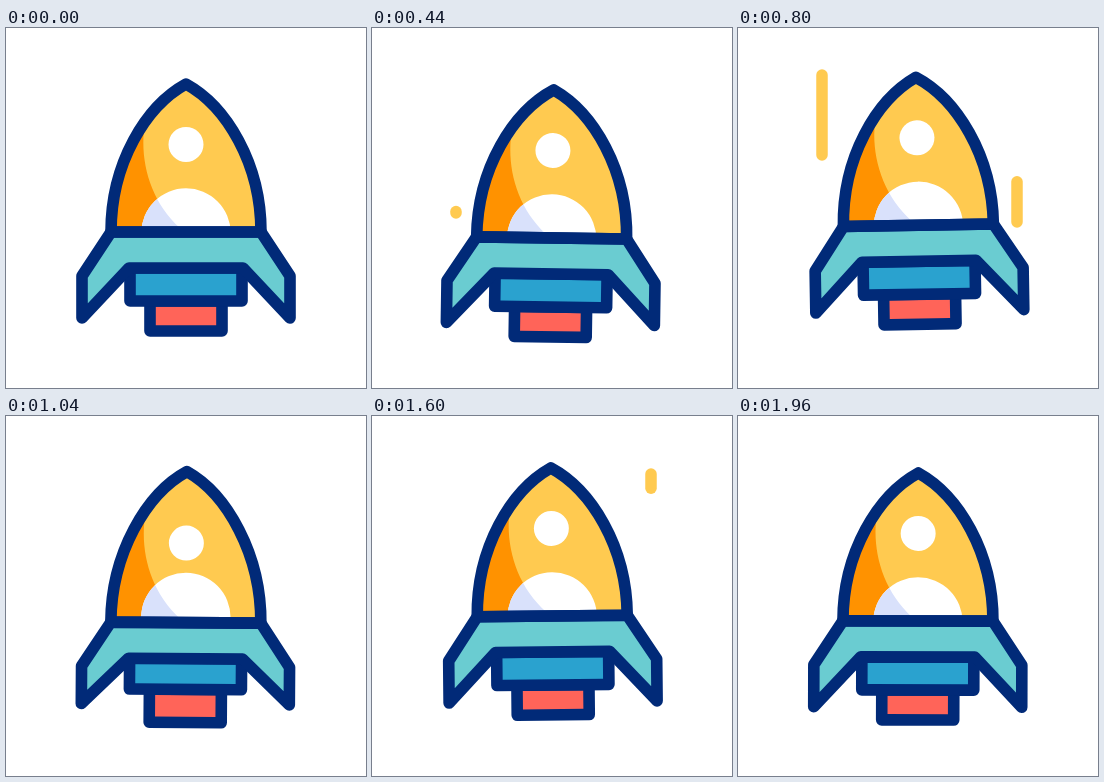
Recreate the animation shown at these times as an HTML page. Size 360 by 360 pixels, loop 2000 ms.

```html
<!DOCTYPE html>
<html lang="en">
<head>
<meta charset="utf-8">
<title>Rocket</title>
<style>
html, body { margin: 0; width: 100%; height: 100%; overflow: hidden; background: #fff; }
svg { display: block; width: 100vw; height: 100vh; }
</style>
</head>
<body>
<svg viewBox="0 0 360 360">
  <defs>
    <path id="hull"/>
    <path id="shade" d="M139 95C133 130 143 172 174 200V210H90V40H139Z"/>
    <circle id="torso" cx="180" cy="205" r="44.7"/>
    <clipPath id="inHull"><use href="#hull"/></clipPath>
    <clipPath id="inShade"><use href="#shade"/></clipPath>
  </defs>
  <g stroke="#ffca50" stroke-width="11.5" stroke-linecap="round">
    <line id="left" x1="84" x2="84"/>
    <line id="right" x1="279" x2="279"/>
  </g>
  <g id="rocket">
    <g clip-path="url(#inHull)">
      <use href="#hull" fill="#ffca50"/>
      <use href="#shade" fill="#ff9200"/>
      <use href="#torso" fill="#fff"/>
      <g clip-path="url(#inShade)"><use href="#torso" fill="#d9e1fb"/></g>
      <circle id="head" cx="180" r="17.5" fill="#fff"/>
    </g>
    <g stroke="#012a78" stroke-width="11.6" stroke-linejoin="round">
      <path id="nozzle" fill="#ff6459"/>
      <path id="engine" fill="#2aa2cf"/>
      <path id="wings" fill="#6accd1"/>
      <use href="#hull" fill="none"/>
    </g>
  </g>
</svg>
<script>
const LOOP = 2000, BOB = LOOP / 3, STREAK = 480, FIRST_STREAK = 300;
const FLEX_START = 800, FLEX_SPAN = 620;
const get = id => document.getElementById(id);
const set = (id, name, value) => get(id).setAttribute(name, value);
const streaks = [
  { id: 'left', top: 32, bottom: 185, head: 228, tail: 290, span: 160 },
  { id: 'right', top: 58, bottom: 194, head: 121, tail: 193, span: 200 }
];

const clamp = u => Math.min(1, Math.max(0, u));

function ease(u) {
  u = clamp(u);
  return u * u * (3 - 2 * u);
}

// Sine bob that starts and ends the loop at rest
function bob(t) {
  const quarter = BOB / 4;
  if (t < quarter) return -ease(t / quarter);
  if (t > LOOP - quarter) return ease((LOOP - t) / quarter);
  return -Math.sin(2 * Math.PI * t / BOB);
}

// The passenger nods once per loop while the ship flexes
function drawShip(t) {
  const k = Math.sin(Math.PI * clamp((t - FLEX_START) / FLEX_SPAN)) ** 2;
  const tip = 56 - 3.5 * k, fin = 290 - 5 * k;
  const floor = 273 - 2.5 * k, end = 303 + k;
  set('hull', 'd', `M105 204C105 135 140 ${tip + 22} 180 ${tip}C220 ${tip + 22} 255 135 255 204Z`);
  set('wings', 'd', `M105 204L76 248V${fin}L123 240H237L284 ${fin}V248L255 204Z`);
  set('engine', 'd', `M124 240H236V${floor}H124Z`);
  set('nozzle', 'd', `M144 ${floor}H216V${end}H144Z`);
  set('head', 'cy', 116.5 + 9 * k);
  set('torso', 'cy', 205 - 7 * k);
}

function drawStreak(s, t) {
  const p = t % STREAK;
  const at = start => s.top + (s.bottom - s.top) * ease((p - start) / s.span);
  const shown = t >= FIRST_STREAK && p > s.head && p < s.tail + s.span;
  set(s.id, 'visibility', shown ? 'visible' : 'hidden');
  set(s.id, 'y1', at(s.tail));
  set(s.id, 'y2', at(s.head) + 0.01);
}

function draw(now) {
  const t = now % LOOP, b = bob(t);
  set('rocket', 'transform', `translate(0 ${7 * b}) rotate(${b} 180 180)`);
  drawShip(t);
  streaks.forEach(s => drawStreak(s, t));
}

const begin = performance.now();
function tick() {
  draw(performance.now() - begin);
  requestAnimationFrame(tick);
}
tick();
</script>
</body>
</html>
```
